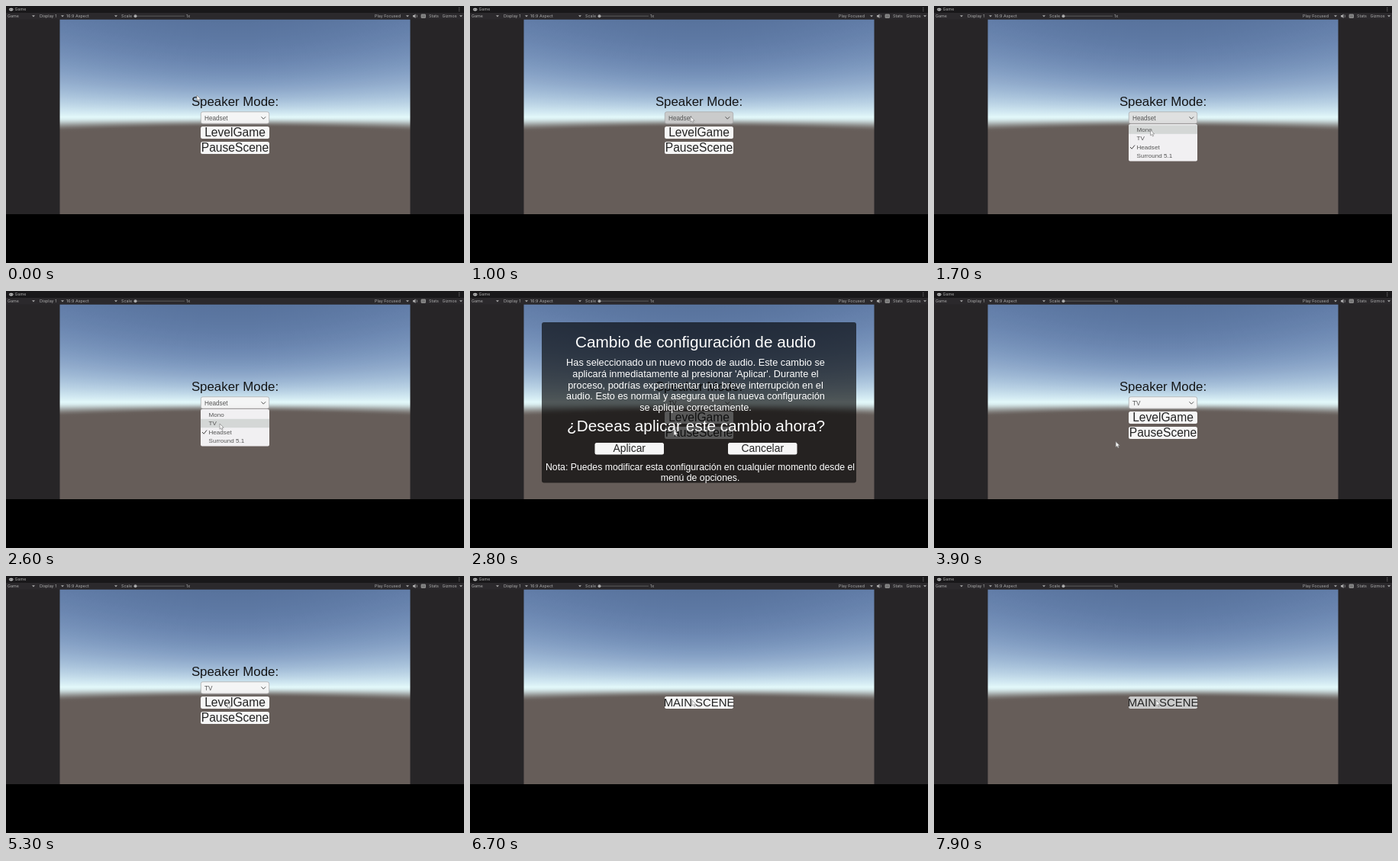
An HTML page with a canvas for the animation above (8000 ms loop, 600 px wide and 337 px high).

```html
<!DOCTYPE html>
<html lang="es">
<head>
<meta charset="utf-8">
<title>Speaker mode menu</title>
<style>
html, body { margin: 0; width: 100%; height: 100%; overflow: hidden; background: #000; }
canvas { display: block; }
</style>
</head>
<body>
<canvas id="stage" width="600" height="337"></canvas>
<script>
const LOOP = 8000, STEP = 100;
const SELECTED = 2700, ASKED = 2800, APPLIED = 3600, SCENE_LOADED = 6700;
const CLICKS = [1200, 2600, 3500, 4800, 5100, 6400, 7600];
const LIST_OPEN = [[1200, 2600], [4800, 5100]];
// Cursor moves: start, duration, goal
const MOVES = [
  [250, 600, 289, 145], [1300, 700, 280, 174], [2600, 600, 230, 206],
  [3800, 500, 308, 124], [4300, 300, 289, 146], [4900, 350, 290, 166],
  [5600, 300, 291, 149], [5900, 300, 291, 163]
];
const SANS = '"Liberation Sans", Arial, sans-serif';
const UI = 'Inter, Roboto, sans-serif';
const ctx = document.getElementById('stage').getContext('2d');

const clamp = k => Math.min(1, Math.max(0, k));
const smooth = k => k * k * (3 - 2 * k);
const mix = (a, b, k) => a + (b - a) * k;
const asking = t => t >= ASKED && t < APPLIED;

const cursorAt = t => MOVES.reduce(([x, y], [start, time, gx, gy]) => {
  const k = smooth(clamp((t - start) / time));
  return [mix(x, gx, k), mix(y, gy, k)];
}, [250, 117]);

const listAlpha = t => Math.max(...LIST_OPEN.map(([open, close]) =>
  Math.min(clamp((t - open) / 200), clamp(1 - (t - close) / 200))));

// Buttons darken a little under the cursor, more when clicked, with a short lag
function tint(t, [x, y, w, h], enabled) {
  const over = time => {
    const [cx, cy] = cursorAt(time);
    return enabled(time) && cx > x && cx < x + w && cy > y && cy < y + h;
  };
  const hover = (over(t - STEP) + over(t - 2 * STEP)) / 2;
  const pressed = over(t) && CLICKS.includes(t);
  const v = 246 - 44 * hover - 35 * pressed;
  return `rgb(${v},${v},${v})`;
}

function text(str, x, middle, size, color, align = 'center', font = SANS) {
  ctx.font = `${size}px ${font}`;
  ctx.textAlign = align;
  ctx.fillStyle = color;
  ctx.fillText(str, x, middle + size * .33);
}

function box(x, y, w, h, r, fill, stroke) {
  ctx.beginPath();
  ctx.roundRect(x, y, w, h, r);
  ctx.fillStyle = fill;
  ctx.fill();
  if (!stroke) return;
  ctx.strokeStyle = stroke;
  ctx.lineWidth = .7;
  ctx.stroke();
}

function line(color, width, ...points) {
  ctx.beginPath();
  points.forEach(p => ctx.lineTo(...p));
  ctx.strokeStyle = color;
  ctx.lineWidth = width;
  ctx.stroke();
}

function polygon(color, ...points) {
  ctx.beginPath();
  points.forEach(p => ctx.lineTo(...p));
  ctx.closePath();
  ctx.fillStyle = color;
  ctx.fill();
}

function button(t, label, rect, size, enabled) {
  const [x, y, w, h] = rect;
  box(...rect, 2.5, tint(t, rect, enabled));
  text(label, x + w / 2, y + h / 2, size, '#242424');
}

// Haze thins out exponentially above the horizon and blends to earth below it
function skyColor(y) {
  const zenith = [82, 108, 145], haze = [226, 248, 250], earth = [102, 93, 89];
  const depth = [40, 42, 58];
  const rgb = haze.map((h, i) => y < 0
    ? mix(zenith[i], h, Math.exp(y / depth[i]))
    : mix(h, earth[i], smooth(clamp(y / 13))));
  return `rgb(${rgb})`;
}

// Each column is stretched about the eye line, which bends the horizon
function sky() {
  const eye = 145.5, focal = 221, half = 128;
  const fill = ctx.createLinearGradient(0, -half, 0, half);
  for (let y = -half; y <= half; y += 2) {
    fill.addColorStop((y + half) / (2 * half), skyColor(y));
  }
  ctx.save();
  ctx.beginPath();
  ctx.rect(70.5, 17.5, 459, 255.5);
  ctx.clip();
  ctx.fillStyle = fill;
  for (let x = 70; x < 530; x++) {
    ctx.setTransform(1, 0, 0, Math.hypot(1, (x - 300) / focal), 0, eye);
    ctx.fillRect(x, -half - 1, 1, 2 * half + 2);
  }
  ctx.restore();
}

function toolbar() {
  const ink = '#aaa';
  const label = (str, x, y = 13.2) => text(str, x, y, 5.4, ink, 'left', UI);
  ctx.fillStyle = '#19181a';
  ctx.fillRect(0, 0, 600, 9);
  ctx.fillStyle = '#2b292c';
  ctx.fillRect(0, 9, 600, 8.5);
  box(4, 2.8, 5.5, 3.6, 1.8, '#c4c4c4');
  [5, 7.3].forEach(x => box(x, 4, 1.2, 1.2, .6, '#19181a'));
  label('Game', 11.5, 4.7);
  label('Game', 2);
  label('Display 1', 44);
  label('16:9 Aspect', 79);
  label('Scale', 151);
  label('1x', 236);
  label('Play Focused', 483);
  label('Stats', 554);
  label('Gizmos', 571.5);
  [36, 74, 144, 526, 596].forEach(x =>
    polygon(ink, [x - 2, 12.2], [x + 2, 12.2], [x, 14.4]));
  line('#666', .8, [170, 13.2], [234, 13.2]);
  box(167.5, 11.2, 4, 4, 2, ink);
  polygon(ink, [533, 12], [534.5, 12], [536.5, 10.5], [536.5, 16], [534.5, 14.5], [533, 14.5]);
  line(ink, .7, [538, 11.5], [538.6, 13.2], [538, 15]);
  box(544, 11, 5.5, 4.5, .5, '#777', ink);
  for (let y = 2; y < 7; y += 2) box(593.3, y - .2, 1, 1, .5, ink);
}

function paintBackdrop() {
  ctx.fillStyle = '#000';
  ctx.fillRect(0, 0, 600, 337);
  ctx.fillStyle = '#272527';
  ctx.fillRect(0, 17, 600, 256);
  sky();
  toolbar();
  const copy = document.createElement('canvas');
  copy.width = 600;
  copy.height = 337;
  copy.getContext('2d').drawImage(ctx.canvas, 0, 0);
  return copy;
}
const backdrop = paintBackdrop();

function optionList(t) {
  const current = t < SELECTED ? 2 : 1;
  const pitch = 11.5, cursorY = cursorAt(t)[1];
  ctx.globalAlpha = listAlpha(t);
  box(255, 155, 90, 48.5, 2, '#f1f0f2');
  ['Mono', 'TV', 'Headset', 'Surround 5.1'].forEach((name, i) => {
    const y = 162 + i * pitch;
    if (Math.abs(cursorY - y) < pitch / 2) {
      ctx.fillStyle = '#d4d7d6';
      ctx.fillRect(255, y - pitch / 2, 90, pitch);
    }
    text(name, 265.5, y, 8.1, '#555', 'left');
    if (i === current) line('#444', 1, [257, y], [259.2, y + 2.3], [263, y - 2.5]);
  });
  ctx.globalAlpha = 1;
}

function menu(t) {
  const free = time => !asking(time);
  const uncovered = time => free(time) && !listAlpha(time);
  const drop = [255.3, 138.8, 89.4, 15.4];
  text('Speaker Mode:', 300, 125.5, 16.85, '#141516');
  ctx.globalAlpha = asking(t) ? .3 : .95;
  box(...drop, 2.5, tint(t, drop, free), '#a09fa0');
  ctx.globalAlpha = 1;
  text(t < SELECTED ? 'Headset' : 'TV', 260, 147, 8.2, '#555', 'left');
  line('#555', 1, [334.5, 145.3], [337.3, 148.2], [340.1, 145.3]);
  button(t, 'LevelGame', [255, 158, 90, 16], 15.6, uncovered);
  button(t, 'PauseScene', [255, 178, 90, 16], 15.6, uncovered);
  if (listAlpha(t)) optionList(t);
}

function dialog(t) {
  const white = (str, x, y, size) => text(str, x, y, size, '#fff');
  box(94, 41, 412, 210.5, 3, 'rgba(4,4,4,.65)');
  white('Cambio de configuración de audio', 295.5, 67.2, 20.75);
  ['Has seleccionado un nuevo modo de audio. Este cambio se',
   "aplicará inmediatamente al presionar 'Aplicar'. Durante el",
   'proceso, podrías experimentar una breve interrupción en el',
   'audio. Esto es normal y asegura que la nueva configuración',
   'se aplique correctamente.']
    .forEach((row, i) => white(row, 295.5, 94.2 + i * 14.65, 12.75));
  white('¿Deseas aplicar este cambio ahora?', 296, 177, 20.75);
  button(t, 'Aplicar', [163.5, 199, 90.5, 15.5], 13.9, asking);
  button(t, 'Cancelar', [338, 199, 90.5, 15.5], 13.9, asking);
  white('Nota: Puedes modificar esta configuración en cualquier momento desde el', 301.5, 230.5, 12.27);
  white('menú de opciones.', 301.5, 244.7, 12.27);
}

function cursor(x, y) {
  ctx.save();
  ctx.translate(x, y);
  polygon('#f4f4f4', [0, 0], [0, 7.2], [1.7, 5.8], [2.9, 8.4], [4.1, 7.8], [3, 5.3], [5.2, 5.2]);
  ctx.strokeStyle = '#777';
  ctx.lineWidth = .6;
  ctx.stroke();
  ctx.restore();
}

function draw(t) {
  ctx.drawImage(backdrop, 0, 0);
  if (t < SCENE_LOADED) menu(t);
  else button(t, 'MAIN SCENE', [255, 158, 90, 16], 14.9, time => time >= SCENE_LOADED);
  if (asking(t)) dialog(t);
  cursor(...cursorAt(t));
}

function tick() {
  const t = performance.now() % LOOP;
  draw(Math.floor(t / STEP) * STEP);
  requestAnimationFrame(tick);
}
tick();
</script>
</body>
</html>
```
